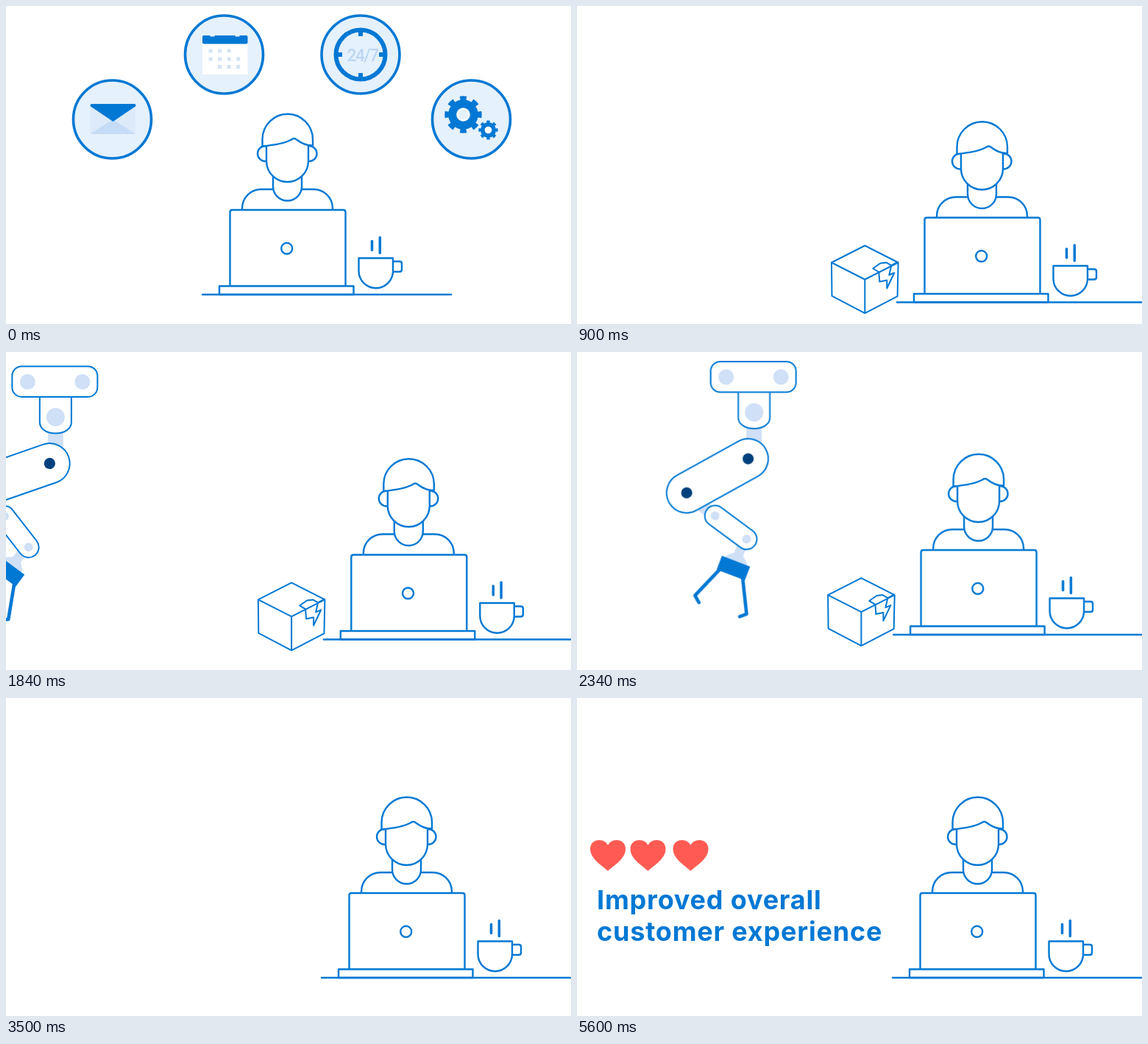
Write an HTML page that moves like this. It is 768 px wide and 432 px high and loops after 5940 ms.

```html
<!DOCTYPE html>
<html lang="en">
<head>
<meta charset="utf-8">
<title>Customer experience</title>
<style>
html, body { margin: 0; width: 100%; height: 100%; overflow: hidden; background: #fff; }
svg { display: block; width: 100vw; height: 100vh; }
.line { fill: #fff; stroke: #0078d4; stroke-width: 2.4; stroke-linejoin: round; }
.open { fill: none; }
.thin { stroke-width: 2; }
.blue { fill: #0078d4; }
.navy { fill: #00417d; }
.pale { fill: #cfe0f7; }
.disc { fill: #e5f1fc; stroke: #0078d4; stroke-width: 3.6; }
.ring { fill: none; stroke: #0078d4; }
.heart { fill: #ff5b53; }
#title { font: 700 36px Inter, "Open Sans", sans-serif; letter-spacing: .8px; fill: #0078d4; }
</style>
</head>
<body>
<svg viewBox="0 0 768 432">
  <defs>
    <circle id="disc" r="53" class="disc"/>
    <path id="heart" class="heart" d="M0 21C-4 16-24 6-24-9C-24-17-18-21-12-21C-6-21-2-18 0-14C2-18 6-21 12-21C18-21 24-17 24-9C24 6 4 16 0 21Z"/>
    <g id="gear" class="ring">
      <circle r="14.8" stroke-width="11" fill="#fff"/>
      <circle r="21.7" stroke-width="7" pathLength="16" stroke-dasharray="1" stroke-dashoffset=".5"/>
    </g>
  </defs>

  <g id="icons">
    <g transform="translate(144.5 154)">
      <use href="#disc"/>
      <rect x="-30" y="-21" width="61.5" height="41" rx="2" fill="#dceafa"/>
      <path d="M-30 20L1 0L31.5 20Z" fill="#c5dbf6"/>
      <path class="blue" d="M-28-21H30Q32-21 32-18L1 3L-30-18Q-30-21-28-21Z"/>
    </g>
    <g transform="translate(296.5 66)">
      <use href="#disc"/>
      <path d="M-29.5-16H32V27H-29.5Z" fill="#fff"/>
      <rect class="blue" x="-29.5" y="-26" width="61.5" height="11.5" rx="2"/>
      <path d="M-19-26h6M15-26h6" stroke="#e5f1fc" stroke-width="3"/>
      <path d="M-21-5h30M-21 6h43M-8.5 16.5h32" stroke="#d3e3f6" stroke-width="5" stroke-dasharray="5 7.6"/>
    </g>
    <g transform="translate(482 66)">
      <use href="#disc"/>
      <circle class="ring" r="33.5" stroke-width="6"/>
      <path class="ring" stroke-width="6" d="M0-35v10M0 25v10M-35 0h10M25 0h10"/>
      <text x="2.5" y="8.5" text-anchor="middle" font-family="Roboto, sans-serif" font-weight="500" font-size="23" letter-spacing="-1.6" fill="#bdd5f4">24/7</text>
    </g>
    <g transform="translate(632.5 154)">
      <use href="#disc"/>
      <g transform="translate(-11 -6.5)"><use href="#gear"/><circle r="6.5" fill="#e5f1fc"/></g>
      <use href="#gear" transform="translate(23 14.5) scale(.52)"/>
    </g>
  </g>

  <g id="scene">
    <g class="line">
      <path d="M321 277V275C321 260 333 249 347 249H418C432 249 444 260 444 275V277"/>
      <path d="M363 225V245A19.5 19.5 0 0 0 402 245V225"/>
      <path d="M354 190H352.5A10.5 10.5 0 0 0 352.5 211H354M411 190H412A10.5 10.5 0 0 1 412 211H411"/>
      <path d="M354 186V210.500A28.500 28.500 0 0 0 411 210.500V186"/>
      <path d="M348.500 190.500V181A34.250 34.250 0 0 1 417 181V189.500Q406 190 395 181.500Q391.500 178.500 388 181.500C378 187 365 189 348.500 190.500Z"/>
      <path d="M304.500 381V280Q304.500 277 307.500 277H458.500Q461.500 277 461.500 280V381Z"/>
      <circle cx="381.700" cy="329.300" r="7.500"/>
      <path d="M290 380.500H472.500V392H290Z"/>
      <path d="M267 392H605" stroke-linecap="round"/>
      <path d="M526 347H535Q538 347 538 350V358Q538 361 535 361H522"/>
      <path d="M479.500 342.500H526V360A23.250 23.250 0 0 1 479.500 360Z"/>
      <path d="M497.500 319.500V331.500M508.300 314.500V335.500" stroke-width="3.500" stroke-linecap="round"/>
    </g>

    <g id="robot" class="thin">
      <path class="pale" d="M-2.500-43h21v20h-21z"/>
      <path class="line thin" d="M-13.500-92V-56C-13.500-47-4-41 8-41S29.500-47 29.500-56V-92"/>
      <rect class="line thin" x="-51" y="-132" width="116" height="41.500" rx="13"/>
      <g class="pale">
        <circle cx="-30" cy="-111" r="10.500"/>
        <circle cx="44.500" cy="-111" r="10.500"/>
        <circle cx="8" cy="-63" r="12.500"/>
      </g>
      <g id="upper">
        <g id="fore">
          <path class="pale" d="M0-6H50V10H0Z"/>
          <g id="grip" transform="translate(102.800 2.200) rotate(-15.500) translate(-2.600 43.200)">
            <path class="pale" d="M-6.500-43H6.500V-20L15-13V-9H-15V-13L-6.500-20Z"/>
            <path class="ring" stroke-width="4.600" stroke-linecap="round" stroke-linejoin="round" d="M-17 9L-35.500 53.500L-27 60.500M17 9L39 52L31.500 58.500"/>
            <rect class="blue" x="-20.500" y="-10" width="41" height="20"/>
          </g>
          <rect class="line thin" x="35.600" y="-11.800" width="81.200" height="28" rx="14"/>
          <circle class="pale" cx="49.600" cy="2.200" r="6"/>
          <circle class="pale" cx="102.800" cy="2.200" r="6"/>
        </g>
        <rect class="line thin" x="-122.800" y="-27.300" width="150.100" height="54.600" rx="27.300"/>
        <circle class="navy" r="7.600"/>
        <circle class="navy" cx="-95.500" r="7.600"/>
      </g>
    </g>

    <g id="box" class="line">
      <path class="thin" d="M0-46L45.300-23L44.300 23L0 46L-44.800 22.500L-45.300-23Z"/>
      <path class="open thin" d="M-45.300-23L0 0L45.300-23M0 0V46"/>
      <path class="open thin" d="M45.300-24L36-19L29-23L21-22L11-15L19-10L20 3L30 1L30 12L40-9L33-6L36-19"/>
    </g>
  </g>

  <g id="title">
    <text x="27" y="287">Improved overall</text>
    <text x="27" y="330">customer experience</text>
  </g>
  <g id="hearts">
    <use href="#heart"/><use href="#heart"/><use href="#heart"/>
  </g>
</svg>
<script>
const LOOP = 5940, GRAB = 2820, ARM = 95.5;
const $ = id => document.getElementById(id);
const span = (t, from, to) => Math.min(1, Math.max(0, (t - from) / (to - from)));
const smooth = u => u * u * (3 - 2 * u);
const easeOut = u => 1 - (1 - u) ** 3;
const backOut = u => u && 1 + 2.7 * (u - 1) ** 3 + 1.7 * (u - 1) ** 2;
const mix = (a, b, u) => a + (b - a) * u;
const place = (el, x, y, more = "") => el.setAttribute("transform", `translate(${x} ${y}) ${more}`);
const fade = (el, a) => el.setAttribute("opacity", a);
const turn = (x, y, deg) => {
  const r = deg * Math.PI / 180, c = Math.cos(r), s = Math.sin(r);
  return [x * c - y * s, x * s + y * c];
};
const hearts = [[42, 4770], [96.5, 5070], [154.5, 5330]];

function moveScene(t) {
  // A quick slide to the right, then a slow drift upwards
  const k = smooth(span(t, 50, 610)), s = Math.min(t, 2658) - 900;
  place($("scene"), k * (168 - .0034 * s), k * (10.5 - .0128 * s));
}

function moveRobot(t) {
  const d = t - GRAB;
  const x = 237.2 + (d < 0 ? .35 : -.82) * d, y = 153;
  const up = 38.4 + .0197 * Math.min(d, 0);
  const fore = 21.5 - .0312 * d;
  const grip = fore - 15.5;
  place($("robot"), x, y);
  $("upper").setAttribute("transform", `rotate(${-up})`);
  place($("fore"), -ARM, 0, `rotate(${fore + up})`);

  // The box rests on the floor until the gripper takes it
  const elbow = turn(-ARM, 0, -up), wrist = turn(102.8, 2.2, fore), hang = turn(2.2, 134, grip);
  const held = smooth(span(t, 2730, 2810));
  const bx = mix(223.3, x + elbow[0] + wrist[0] + hang[0], held);
  const by = mix(361, y + elbow[1] + wrist[1] + hang[1], held);
  const size = easeOut(span(t, 300, 600));
  place($("box"), bx, by, `rotate(${held * (grip - 6)}) scale(${size})`);
}

function draw(now) {
  const t = now % LOOP;
  moveScene(t);
  moveRobot(t);

  const leave = span(t, 50, 400);
  place($("icons"), 0, -7 * leave);
  fade($("icons"), 1 - leave);

  const enter = span(t, 4450, 4960);
  place($("title"), 0, 24 * (1 - easeOut(enter)));
  fade($("title"), enter);
  hearts.forEach(([x, at], i) =>
    place($("hearts").children[i], x, 214, `scale(${backOut(span(t, at, at + 260))})`));
}

const start = performance.now();
function tick() {
  draw(performance.now() - start);
  requestAnimationFrame(tick);
}
tick();
</script>
</body>
</html>
```
